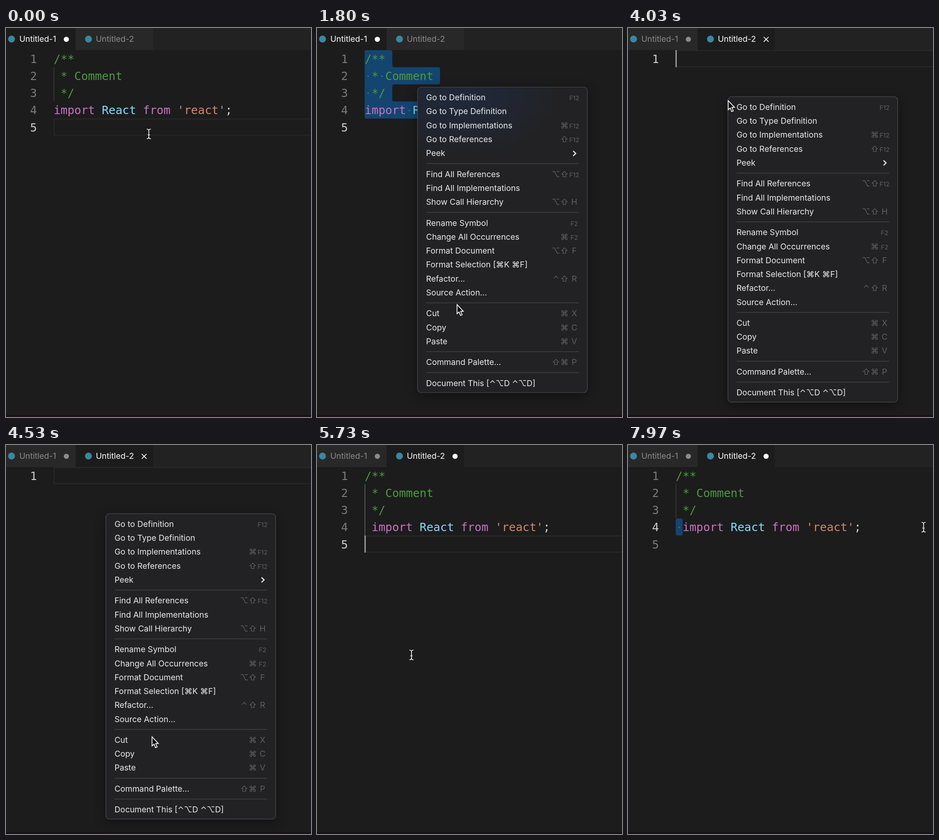
An HTML page that plays this animation: 662 by 845 pixels, repeating every 8000 ms.

```html
<!DOCTYPE html>
<html lang="en">
<head>
<meta charset="utf-8">
<title>Editor copy and paste</title>
<style>
html, body { margin: 0; width: 100%; height: 100%; overflow: hidden; background: #1c1c1c; }
svg { display: block; width: 100vw; height: 100vh; }
text { white-space: pre; }
.code { font: 24.75px "DejaVu Sans Mono", "Liberation Mono", monospace; }
.ui { font: 17.6px Inter, "DejaVu Sans", sans-serif; }
.key { font: 17.6px Inter, "DejaVu Sans", sans-serif; fill: #606063; text-anchor: middle; }
.fkey { font-size: 13.6px; }
.box { filter: drop-shadow(0 6px 12px rgba(0, 0, 0, .4)); }
</style>
</head>
<body>
<svg id="stage" viewBox="0 0 662 845" preserveAspectRatio="none">
  <defs>
    <radialGradient id="tint" gradientUnits="userSpaceOnUse" cx="0" cy="0" r="1" gradientTransform="translate(310 150) scale(215 130)">
      <stop offset="0" stop-color="#1e2d4a" stop-opacity=".6"/>
      <stop offset=".5" stop-color="#1e2a42" stop-opacity=".45"/>
      <stop offset="1" stop-color="#1e2a42" stop-opacity="0"/>
    </radialGradient>
  </defs>
  <rect width="662" height="845" fill="#1c1c1c"/>
  <rect width="662" height="48" fill="#222"/>
  <rect y="841" width="662" height="4" fill="#1b1215"/>
</svg>
<script>
const LOOP = 8000, COL = 14.9, ROW = 37.15, LEFT = 103.6, TOP = 48;
const svg = document.getElementById('stage');

function add(parent, tag, attrs, text) {
  const el = document.createElementNS('http://www.w3.org/2000/svg', tag);
  for (const k in attrs) el.setAttribute(k, attrs[k]);
  if (text !== undefined) el.textContent = text;
  parent.appendChild(el);
  return el;
}
const group = (parent = svg) => add(parent, 'g', {});
const show = (el, on) => el.setAttribute('visibility', on ? 'inherit' : 'hidden');
const colX = c => LEFT + c * COL;
const rowY = r => TOP + (r - 1) * ROW;

// Tabs
function makeTab(x, w, iconX, textX, dotX, label) {
  const bg = add(svg, 'rect', { x, width: w, height: 48 });
  add(svg, 'circle', { cx: iconX, cy: 24, r: 7.5, fill: '#3a86a3' });
  const name = add(svg, 'text', { x: textX, y: 30.3, class: 'ui' }, label);
  const dot = add(svg, 'circle', { cx: dotX, cy: 24.5, r: 5.6 });
  const cross = add(svg, 'path', {
    d: `M${dotX - 5} 19.5l10.4 10.4m0-10.4l-10.4 10.4`, 'stroke-width': 1.7, fill: 'none'
  });
  return (active, dirty, hover) => {
    const ink = active ? '#fff' : '#8c8c8c';
    bg.setAttribute('fill', active ? '#1c1c1c' : '#282828');
    name.setAttribute('fill', ink);
    dot.setAttribute('fill', ink);
    cross.setAttribute('stroke', ink);
    show(dot, dirty);
    show(cross, !dirty && (active || hover));
  };
}
const tab1 = makeTab(0, 151, 12, 29, 131, 'Untitled-1');
const tab2 = makeTab(151, 168, 179, 195, 299.7, 'Untitled-2');

// Editor
const lineBox = add(svg, 'rect', { x: 104.5, width: 570, height: 35, fill: 'none', stroke: '#282828', 'stroke-width': 2 });
const guide = add(svg, 'rect', { x: 103.4, y: rowY(2), width: 1.3 });
const SEL = '#14456f';
const selAll = group(), selSpace = group();
add(selAll, 'path', {
  fill: SEL,
  d: 'M107.4 48H159.4q4 0 4 4V81.2q0 4 4 4H263q4 0 4 4v29.2q0 4-4 4H167.4q-4 0-4 4v29.2q0 4 4 4H502.4q4 0 4 4v29.2q0 4-4 4H107.4q-4 0-4-4V52q0-4 4-4z'
});
add(selSpace, 'rect', { x: 103.6, y: rowY(4), width: COL, height: ROW, rx: 4, fill: SEL });
const spaceDot = (parent, c, r) =>
  add(parent, 'circle', { cx: colX(c + .5), cy: rowY(r) + 19.5, r: 1.6, fill: '#3d6f97' });
[[0, 2], [2, 2], [0, 3], [6, 4], [12, 4], [17, 4]].forEach(([c, r]) => spaceDot(selAll, c, r));
spaceDot(selSpace, 0, 4);

const token = (parent, c, r, fill, s) =>
  add(parent, 'text', { x: colX(c), y: rowY(r) + 28, fill, class: 'code' }, s);
const codeBox = group(), importLine = group(codeBox);
const GREEN = '#4d9a42', PINK = '#cb74c2';
token(codeBox, 0, 1, GREEN, '/**');
token(codeBox, 1, 2, GREEN, '* Comment');
token(codeBox, 1, 3, GREEN, '*/');
token(importLine, 0, 4, PINK, 'import');
token(importLine, 7, 4, '#84dcfe', 'React');
token(importLine, 13, 4, PINK, 'from');
token(importLine, 18, 4, '#d4876b', "'react'");
token(importLine, 25, 4, '#d4d4d4', ';');

const numbers = [1, 2, 3, 4, 5].map(n =>
  add(svg, 'text', { x: 52.3, y: rowY(n) + 28, class: 'code' }, n));
const caret = add(svg, 'rect', { width: 2.4, height: ROW, fill: '#aeafad' });

// Context menu: label and shortcut, or null for a separator
const ITEMS = [
  ['Go to Definition', ',,F12'], ['Go to Type Definition'], ['Go to Implementations', ',⌘,F12'],
  ['Go to References', ',⇧,F12'], ['Peek', '>'], null,
  ['Find All References', '⌥,⇧,F12'], ['Find All Implementations'], ['Show Call Hierarchy', '⌥,⇧,H'], null,
  ['Rename Symbol', ',,F2'], ['Change All Occurrences', ',⌘,F2'], ['Format Document', '⌥,⇧,F'],
  ['Format Selection [⌘K ⌘F]'], ['Refactor…', '⌃,⇧,R'], ['Source Action…'], null,
  ['Cut', ',⌘,X'], ['Copy', ',⌘,C'], ['Paste', ',⌘,V'], null,
  ['Command Palette…', '⇧,⌘,P'], null, ['Document This [⌃⌥D ⌃⌥D]']
];
const menu = group();
const frame = { x: 218.2, y: 128.5, width: 368.6, height: 663.5, rx: 8 };
add(menu, 'rect', { ...frame, fill: '#222224', class: 'box' });
const tint = add(menu, 'rect', { ...frame, fill: 'url(#tint)' });
add(menu, 'rect', { ...frame, fill: 'none', stroke: '#4c4c4e', 'stroke-width': 1.2 });
const mark = add(menu, 'rect', { x: 224, width: 357, height: 30.2, rx: 6, fill: '#1f5fc4' });
const rowMid = {};
let mid = 151;
for (const item of ITEMS) {
  if (!item) {
    add(menu, 'rect', { x: 237, y: mid - 8.5, width: 331, height: 1.4, fill: '#434345' });
    mid += 15.2;
    continue;
  }
  const [label, keys] = item;
  rowMid[label] = mid;
  add(menu, 'text', { x: 236.8, y: mid + 6.2, fill: '#ececed', class: 'ui' }, label);
  if (keys === '>') {
    add(menu, 'path', { d: `M556 ${mid - 5}l5.6 5.4l-5.6 5.4`, fill: 'none', stroke: '#ececed', 'stroke-width': 2.3 });
  } else if (keys) {
    keys.split(',').forEach((k, i) => k && add(menu, 'text', {
      x: [518.5, 537, 558.4][i], y: mid + 6.2, class: k.length > 1 ? 'key fkey' : 'key'
    }, k));
  }
  mid += 30.25;
}

// Pointers
const pointer = group(), beam = group(pointer), arrow = group(pointer), hand = group(pointer);
const BEAM = 'M-4.5-10.5q4 0 4.5 3q.5-3 4.5-3M0-8V8M-4.5 10.5q4 0 4.5-3q.5 3 4.5 3M-2.6 2h5.2';
add(beam, 'path', { d: BEAM, fill: 'none', stroke: '#111', 'stroke-width': 3.4 });
add(beam, 'path', { d: BEAM, fill: 'none', stroke: '#f4f4f4', 'stroke-width': 1.7 });
add(arrow, 'path', {
  d: 'M0 0V19.5L4.4 15.6L7.5 23.4L11 22L7.8 14.4H13.6Z', fill: '#000', stroke: '#fff', 'stroke-width': 1.7
});
add(hand, 'path', {
  d: 'M-2 1q2-3 4 0l2 7q2-2 3.5 0q2-1.5 3.3.3q2.4-.8 3 1.5l.6 4q.3 4-2 8h-8q-2-4-6-7.5q-1.5-2.5 1.5-2.2l2.6 1.6z',
  fill: '#fff', stroke: '#111', 'stroke-width': 1.3
});
add(hand, 'path', { d: 'M6 13.5l.8 4.5M8.8 13.3l.6 4.6M11.4 13.2l.3 4.6', stroke: '#222', 'stroke-width': 1 });

// Timeline
const PATH = [
  [0, 310, 230], [460, 310, 230], [1060, 218, 136], [1470, 218, 136], [1800, 304, 601],
  [1980, 300, 648], [2470, 300, 648], [2760, 207, 34], [3370, 207, 34], [3620, 217.5, 158],
  [4050, 217.5, 158], [4530, 317, 634], [4690, 310, 699], [5200, 310, 699], [5600, 205, 456],
  [5790, 205, 456], [6370, 464, 200], [6500, 464, 200], [6780, 119, 179], [6860, 119, 179],
  [7010, 87, 178], [7300, 87, 178], [7930, 641.5, 178.5], [8000, 641.5, 178.5]
];
const BLINK = [-600, 420, 1250, 2480, 3100, 3770, 5280, 6800, 7010];
// open, fade start, closed, highlight from, row, dx, dy
const MENUS = [
  [1230, 2440, 2600, 1960, 'Copy', 0, 0],
  [3785, 5130, 5290, 4680, 'Paste', -1.4, 20.7]
];
const SELECT = 420, SWITCH = 3100, PASTE = 5280, CLICK = 6800, DRAG = 7000;

function place(t) {
  const i = Math.max(1, PATH.findIndex(p => p[0] > t));
  const [t0, x0, y0] = PATH[i - 1], [t1, x1, y1] = PATH[i];
  const u = (t - t0) / (t1 - t0), e = u * u * (3 - 2 * u);
  return [x0 + (x1 - x0) * e, y0 + (y1 - y0) * e];
}

function render(t) {
  const second = t >= SWITCH, pasted = t >= PASTE, filled = !second || pasted;
  const allSel = t >= SELECT && !second, spaceSel = t >= DRAG;
  const line = t >= CLICK ? 4 : filled ? 5 : 1;
  const [x, y] = place(t);
  const open = MENUS.find(m => t >= m[0] && t < m[2]);
  const overTab = !open && y < 48;

  tab1(!second, true);
  tab2(second, pasted, overTab);

  show(codeBox, filled);
  importLine.setAttribute('transform', `translate(${second ? COL : 0} 0)`);
  numbers.forEach((el, i) => {
    show(el, filled || i === 0);
    el.setAttribute('fill', i + 1 === line ? '#cfcfcf' : '#7b7b7b');
  });
  show(selAll, allSel);
  show(selSpace, spaceSel);
  show(lineBox, !allSel && !spaceSel);
  lineBox.setAttribute('y', rowY(line) + 1);
  show(guide, filled && !allSel);
  guide.setAttribute('height', ROW * (second ? 3 : 2));
  guide.setAttribute('fill', pasted && !spaceSel ? '#707070' : '#404040');
  if (spaceSel) guide.setAttribute('height', ROW * 2);

  const reset = BLINK.filter(b => b <= t).pop();
  show(caret, (t - reset) % 1000 < 500);
  caret.setAttribute('x', (t >= CLICK && !spaceSel ? colX(1) : LEFT) - .4);
  caret.setAttribute('y', rowY(line));

  show(menu, !!open);
  if (open) {
    const [, fade, end, lit, row, dx, dy] = open;
    menu.setAttribute('opacity', t < fade ? 1 : (end - t) / (end - fade));
    menu.setAttribute('transform', `translate(${dx} ${dy})`);
    show(tint, !second);
    show(mark, t >= lit);
    mark.setAttribute('y', rowMid[row] - 15.1);
  }

  pointer.setAttribute('transform', `translate(${x} ${y})`);
  const arrowOn = !!open && t < open[1] + 60;
  show(arrow, arrowOn);
  show(hand, overTab);
  show(beam, !arrowOn && !overTab);
}

const start = performance.now();
function tick() {
  render((performance.now() - start) % LOOP);
  requestAnimationFrame(tick);
}
render(0);
requestAnimationFrame(tick);
</script>
</body>
</html>
```
